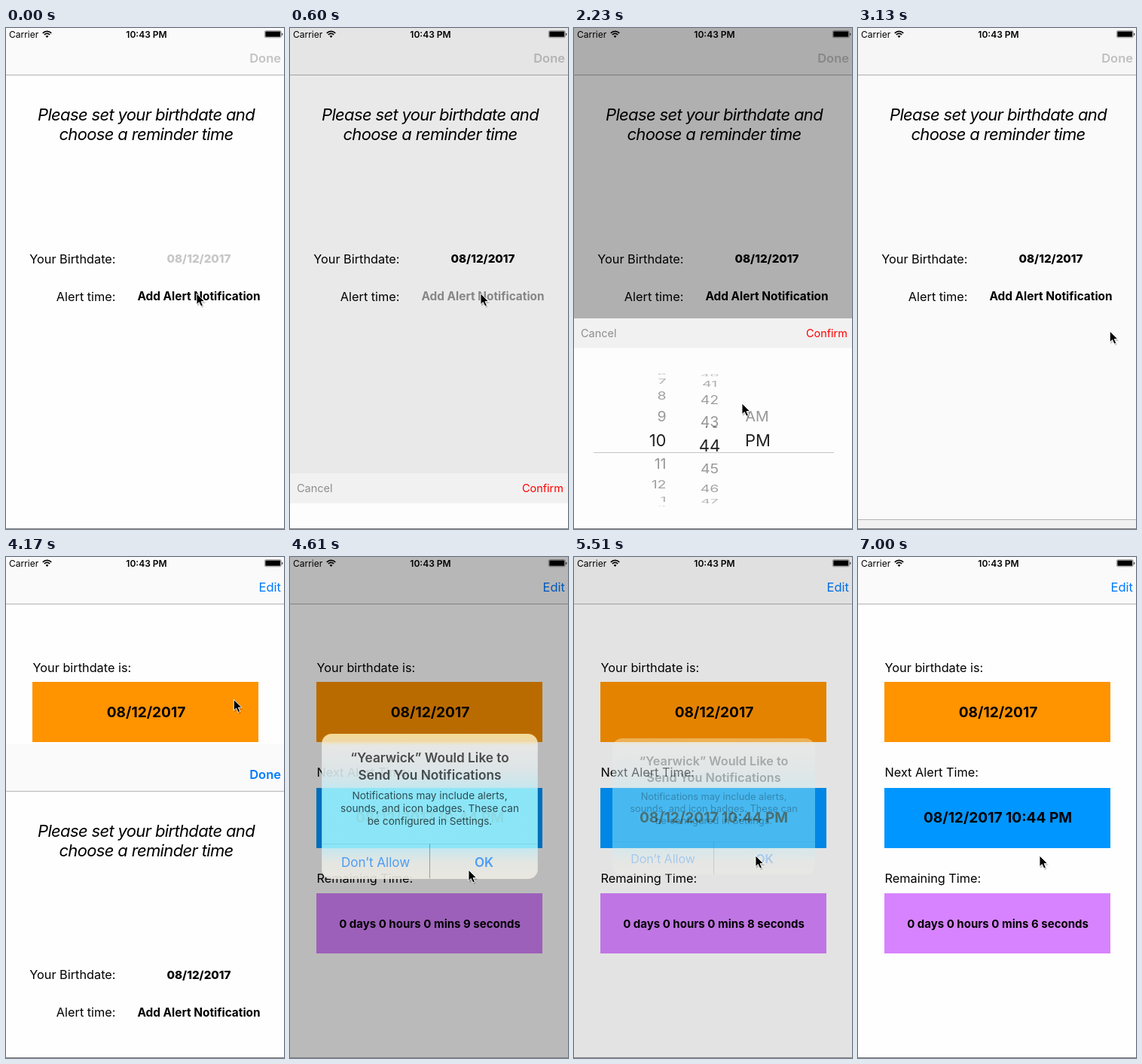
Recreate the animation shown at these times as an HTML page. Size 369 by 666 pixels, loop 8 s.

```html
<!DOCTYPE html>
<html lang="en">
<head>
<meta charset="utf-8">
<title>Reminder setup</title>
<style>
  html, body { margin: 0; width: 100%; height: 100%; overflow: hidden; background: #fff; }
  svg { display: block; width: 100vw; height: 100vh; font-family: Inter, Roboto, sans-serif; }
  .label { font-size: 16.3px; }
  .bold { font-weight: 700; }
  .semi { font-weight: 600; }
  .mid { text-anchor: middle; }
  .end { text-anchor: end; }
  .title { font-size: 22px; font-style: italic; letter-spacing: -.65px; }
  .bar { font-size: 16.5px; fill: #007aff; }
  .tool { font-size: 14.5px; }
  .body { font-size: 12.8px; }
  .big { font-size: 19.1px; }
</style>
</head>
<body>
<svg viewBox="0 0 369 666" preserveAspectRatio="none">
  <defs>
    <linearGradient id="frost" gradientUnits="userSpaceOnUse" x1="0" y1="234" x2="0" y2="429">
      <stop offset="0" stop-color="#fbe7a6"/>
      <stop offset=".065" stop-color="#f6e6c0"/>
      <stop offset=".085" stop-color="#ececea"/>
      <stop offset=".24" stop-color="#e2eaec"/>
      <stop offset=".37" stop-color="#c8ecf4"/>
      <stop offset=".38" stop-color="#9cf4ff"/>
      <stop offset=".78" stop-color="#9cf4ff"/>
      <stop offset=".79" stop-color="#c8ecf4"/>
      <stop offset=".88" stop-color="#e8ebe6"/>
      <stop offset="1" stop-color="#f0ece4"/>
    </linearGradient>
    <clipPath id="band"><rect y="144" width="369" height="34"/></clipPath>
    <clipPath id="rest"><path d="M0 73H369V144H0ZM0 178H369V250H0Z"/></clipPath>
  </defs>

  <g id="home">
    <rect width="369" height="666" fill="#fefefe"/>
    <rect width="369" height="62" fill="#fafafa"/>
    <path d="M0 62.5H369" stroke="#b2b2b2"/>
    <text class="bar end" x="365" y="46">Edit</text>
    <text class="label" x="35.5" y="152.5">Your birthdate is:</text>
    <rect x="35" y="166" width="300" height="80" fill="#ff9300"/>
    <text class="big bold mid" x="186" y="212.5">08/12/2017</text>
    <text class="label" x="35.5" y="292">Next Alert Time:</text>
    <rect x="35" y="307" width="300" height="80" fill="#0096ff"/>
    <text class="big bold mid" x="185.5" y="353">08/12/2017 10:44 PM</text>
    <text class="label" x="35.5" y="432.5">Remaining Time:</text>
    <rect x="35" y="447" width="300" height="80" fill="#d783ff"/>
    <text id="left" class="bold mid" x="185.5" y="492.5" font-size="15"></text>
  </g>

  <g id="setup">
    <rect width="369" height="666" fill="#fefefe"/>
    <rect width="369" height="62" fill="#fafafa"/>
    <path d="M0 62.5H369" stroke="#b2b2b2"/>
    <text id="done" class="bar semi end" x="365" y="46">Done</text>
    <text class="title mid" x="186" y="123">Please set your birthdate and</text>
    <text class="title mid" x="186" y="149">choose a reminder time</text>
    <text class="label end" x="145.5" y="312.5">Your Birthdate:</text>
    <text id="date" class="mid" x="256" y="312.3" font-size="15.2" font-weight="800">08/12/2017</text>
    <text class="label end" x="145.5" y="362.5">Alert time:</text>
    <text id="add" class="bold mid" x="256" y="362.3" font-size="15.4">Add Alert Notification</text>
  </g>

  <g>
    <text x="4" y="12.5" font-size="12">Carrier</text>
    <g fill="none" stroke="#000" stroke-width="1.7">
      <path d="M48.8 6.8A8 8 0 0 1 60.2 6.8M50.8 9A5.2 5.2 0 0 1 58.2 9"/>
    </g>
    <path d="M54.5 13L52.5 10.8A3 3 0 0 1 56.5 10.8Z"/>
    <text class="semi mid" x="186.5" y="12.5" font-size="12">10:43 PM</text>
    <rect x="343.3" y="3.6" width="22" height="9.2" rx="1.8" fill="none" stroke="#000" stroke-width=".6" opacity=".6"/>
    <rect x="344.3" y="4.6" width="20" height="7.2" rx=".8"/>
    <rect x="366" y="6.7" width="1.3" height="3.2" rx=".6" opacity=".7"/>
  </g>

  <rect id="dim" width="369" height="666"/>

  <g id="sheet">
    <rect width="369" height="280" fill="#fdfdfd"/>
    <rect width="369" height="39.5" fill="#f1f1f1"/>
    <path id="edge" d="M0 .5H369" stroke="#b2b2b2"/>
    <text class="tool" x="9" y="24.5" fill="#8e8e8e">Cancel</text>
    <text class="tool end" x="363" y="24.5" fill="#f00">Confirm</text>
    <path d="M26 178.5H345" stroke="#c4c4c4"/>
    <g id="far" clip-path="url(#rest)" font-size="19.5" fill="#888"></g>
    <g id="near" clip-path="url(#band)" font-size="22" fill="#222"></g>
  </g>

  <rect id="glass" rx="13" fill="url(#frost)"/>
  <g id="alert">
    <path d="M-134 47H134" stroke="#000" stroke-opacity=".12"/>
    <path d="M0 47V90" stroke="#456" stroke-opacity=".7"/>
    <g class="mid">
      <g class="semi" font-size="16.2">
        <text y="-55">“Yearwick” Would Like to</text>
        <text y="-33">Send You Notifications</text>
      </g>
      <g class="body">
        <text y="-9">Notifications may include alerts,</text>
        <text y="7">sounds, and icon badges. These can</text>
        <text y="23">be configured in Settings.</text>
      </g>
      <g font-size="16" fill="#007aff">
        <text x="-67.5" y="75.5">Don’t Allow</text>
        <text class="semi" x="67.5" y="75.5">OK</text>
      </g>
    </g>
  </g>

  <path d="M0 665.5H369" stroke="#858585"/>
  <g id="cursor">
    <path d="M1 2V17L4.5 14L7 19L9.5 18L7.3 13H12Z" fill="#000" opacity=".2"/>
    <path d="M0 0V14.5L3.3 11.5L5.8 17L8.4 15.9L6 10.6H10.6Z" stroke="#fff" stroke-width=".9"/>
  </g>
</svg>

<script>
const LOOP = 8000, STEP = 148.9;
const $ = id => document.getElementById(id);
const set = (id, attrs) => {
  for (const k in attrs) $(id).setAttribute(k, attrs[k]);
};
const clamp = v => Math.min(1, Math.max(0, v));
const span = (t, start, length) => clamp((t - start) / length);
const easeOut = x => 1 - (1 - x) ** 2;
const smooth = x => x * x * (3 - 2 * x);
const gray = v => `rgb(${[v, v, v].map(Math.round)})`;

// Keys are [time, ...values]; values between keys are linear.
function track(keys, t) {
  const i = keys.findIndex(k => k[0] > t);
  if (i < 0) return keys[keys.length - 1].slice(1);
  if (i === 0) return keys[0].slice(1);
  const a = keys[i - 1], b = keys[i], x = (t - a[0]) / (b[0] - a[0]);
  return a.slice(1).map((v, j) => v + (b[j + 1] - v) * x);
}

const POINTER = [
  [596, 253, 353], [1340, 223, 499], [2234, 223, 499], [2680, 334.3, 403],
  [3127, 334.3, 403], [3722, 346, 38], [3871, 346, 38], [4615, 237, 416], [5060, 241, 397]
];
const SPIN = [[1638, 0], [1786, .25], [1935, .5], [2085, .5], [2233, .78], [2382, 1]];

const wheel = { far: "", near: "" };
function row(text, d, x, anchor) {
  const a = d * .363, c = Math.cos(a);
  if (Math.abs(a) < 1.53) {
    const y = 162 + 88.5 * Math.sin(a);
    wheel.far += `<text y="7" text-anchor="${anchor}" opacity="${.45 + .45 * c}" ` +
      `transform="translate(${x} ${y}) scale(1 ${c})">${text}</text>`;
  }
  if (Math.abs(d) < 1.2)
    wheel.near += `<text x="${x}" y="${170 + d * 32}" text-anchor="${anchor}">${text}</text>`;
}

function drawWheels(minute) {
  wheel.far = wheel.near = "";
  for (let i = -4; i <= 5; i++) {
    row((i + 21) % 12 + 1, i, 122.5, "end");
    row(43 + i, i - minute, 180, "middle");
  }
  row("AM", -1, 227.5, "start");
  row("PM", 0, 227, "start");
  $("far").innerHTML = wheel.far;
  $("near").innerHTML = wheel.near;
}

function draw(t) {
  const open = easeOut(span(t, 546, 350));
  const shut = easeOut(span(t, 2900, 289));
  const sheet = open * (1 - shut);
  const shown = easeOut(span(t, 4460, 365));
  const gone = easeOut(span(t, 5420, 184));
  const alert = shown * (1 - gone);

  // setup page
  set("setup", { transform: `translate(0 ${666 * smooth(span(t, 3970, 480))})` });
  set("date", { fill: gray(198 * (1 - span(t, 0, 290))) });
  set("add", { fill: gray(t < 590 ? 0 : 146 * (1 - span(t, 596, 450))) });
  $("done").style.fill = t < 3270 ? "#c3c3c3" : "#007aff";

  // time picker
  set("sheet", {
    transform: `translate(0 ${666 - 280 * sheet})`,
    visibility: sheet > 0 ? "visible" : "hidden"
  });
  set("edge", { opacity: shut > 0 ? 1 : 0 });
  drawWheels(track(SPIN, t)[0]);

  // home page countdown
  const secs = 9 - [5050, 6095, 6990].filter(tick => t >= tick).length;
  $("left").textContent = `0 days 0 hours 0 mins ${secs} seconds`;

  // permission alert
  const scale = 1 + .2 * (1 - shown), w = 269 * scale, h = 181 * scale;
  set("glass", {
    x: 185.5 - w / 2, y: 331.5 - h / 2, width: w, height: h,
    opacity: easeOut(alert)
  });
  set("alert", { transform: `translate(185.5 331.5) scale(${scale})`, opacity: alert });
  set("dim", { opacity: .31 * sheet + .4 * alert });

  set("cursor", { transform: `translate(${track(POINTER, t)})` });
}

// The picture advances in even, coarse steps.
let last = -1;
function tick() {
  const step = Math.floor((performance.now() % LOOP + 10) / STEP);
  if (step !== last) draw(step * STEP);
  last = step;
  requestAnimationFrame(tick);
}
tick();
</script>
</body>
</html>
```
